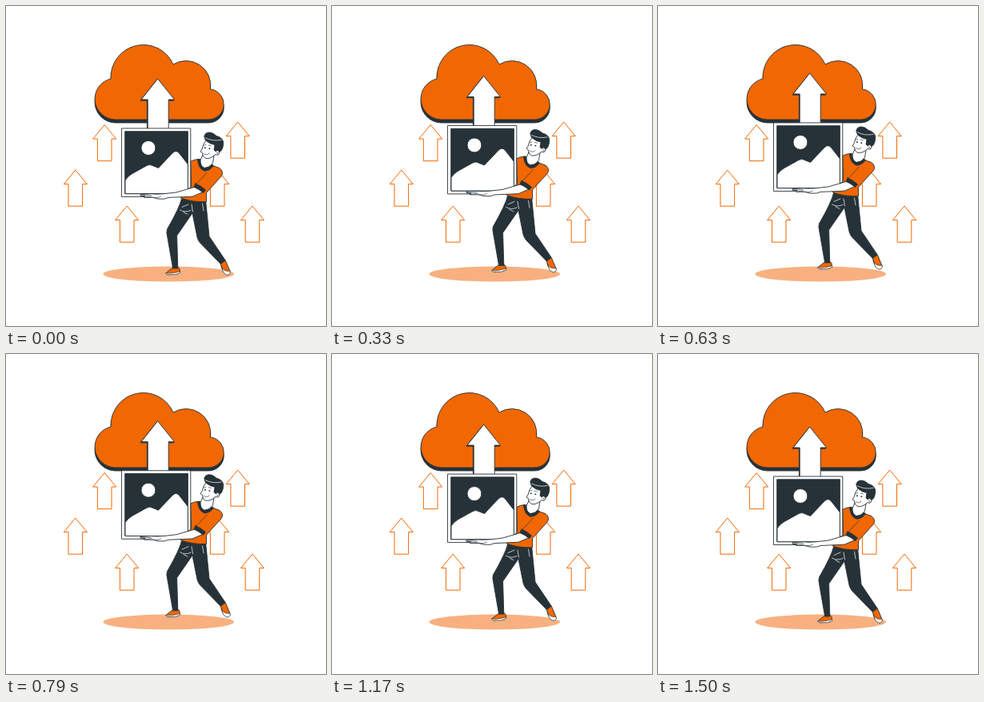
Write an HTML page that moves like this. It is 400 px wide and 400 px high and loops after 1540 ms.

```html
<!DOCTYPE html>
<html lang="en">
<head>
<meta charset="utf-8">
<title>Cloud upload</title>
<style>
  html, body { margin: 0; height: 100%; overflow: hidden; background: #fff; }
  svg { display: block; width: 100vw; height: 100vh; }
  .orange { fill: #f16702; }
  .dark { fill: #263238; }
  .white { fill: #fff; }
  .line { fill: none; }
  .ink { stroke: #263238; stroke-width: .9; stroke-linejoin: round; stroke-linecap: round; }
  .thin { stroke-width: .65; }
  .chalk { fill: none; stroke: #fff; stroke-width: .7; }
</style>
</head>
<body>
<svg viewBox="0 0 400 400">
  <defs>
    <path id="arrow" d="M0 0L14.5 17.6H8.8V45.2H-8.8V17.6H-14.5Z"/>
    <path id="bigArrow" d="M189.8 91.3L210.5 117H203.2V154H177.2V117H169.3Z"/>
    <path id="cloud" d="M136 142A25.85 25.85 0 0 1 131 91A40.7 40.7 0 0 1 209 73A30.8 30.8 0 0 1 255.5 104A19.07 19.07 0 0 1 253 142Z"/>
  </defs>

  <ellipse cx="203.2" cy="335" rx="81.8" ry="9.6" fill="#f8b080"/>
  <g id="arrows" fill="#fff" stroke="#f16702"></g>
  <g class="ink">
    <use href="#cloud" class="dark" y="4"/>
    <use href="#cloud" class="orange"/>
  </g>

  <g id="lift" class="ink">
    <use href="#bigArrow" class="dark" x="-.8" y="1.2"/>
    <use href="#bigArrow" class="white"/>

    <g id="picture">
      <rect class="white" x="144.8" y="153" width="86" height="85.5"/>
      <rect class="dark" x="149" y="156.8" width="78.4" height="77.6"/>
      <circle class="white" cx="178" cy="177.5" r="9"/>
      <path class="white" d="M149 234.4V218Q152 213 158 209.5L176 199.5Q180 197.5 183 199.5L190.5 202.5L208 184Q212.5 179.5 216.5 184L227.4 198V234.4Z"/>
    </g>

    <g id="legs">
      <path class="orange" d="M208.5 327L201.5 332.5Q199 335 202 335.8L215 334.8Q218.5 332.5 217 328.5L214.5 326Z"/>
      <path class="white thin" d="M200 333.8Q207 335 217.8 331.8V333.5L212 335.8H202Q199.5 335.8 200 333.8Z"/>
      <path class="orange" d="M268 321.5L270.5 330Q272.5 335 276.5 336Q280.5 335.5 280 331.5L274.5 318.5Z"/>
      <path class="white thin" d="M269.3 326Q272 332.5 280 331.3Q281.3 335.4 277 336.3Q272.5 335.5 271 331Z"/>
      <path class="dark" d="M219.5 241Q217 252 201.5 279Q200.3 283 201.5 287L208.6 328H214.8L213.6 287L233 259L239 289Q240 293 242.5 296L268.3 322.5L274.2 318L254 288L249.5 242Z"/>
      <path class="chalk" d="M217.5 255Q224 259 231 255.5M220 251.5L228 248M222 258L227 260.5M245.5 247L247 256M232 248L233.5 257"/>
    </g>

    <g id="head">
      <path class="white" d="M246.5 185L243 193Q242 201 248.5 203Q255 203 258.5 196L260 187Z"/>
      <path class="white" d="M250 168Q246 173 245.2 178.5L243 182L245.5 183.5Q245.5 189 249.5 190.5Q256 191.5 262 185.5Q266.5 188 267.3 182L264 170Z"/>
      <path class="dark" d="M248 163Q248.5 158.2 254 158Q259 158.2 263 162.5Q270 164 271.7 170Q272 176 269.5 180.5L266.5 182.5Q265 179 262.3 182L260 180L261 173.5Q256 173 251.5 169.5Q248 167 248 163Z"/>
      <path class="chalk" d="M249.5 165Q258 169.5 269 167.5"/>
      <path class="line thin" d="M247.6 174.2L249.7 173.5M253 174.2Q255 173.6 256.5 175M247.5 184.5Q250.5 187.5 254 184.2M263.5 183.5Q265.5 182 265 185"/>
      <circle class="dark" cx="248.8" cy="177.2" r=".5"/>
      <circle class="dark" cx="254.2" cy="178.2" r=".5"/>
    </g>

    <g id="shirt">
      <path class="orange" d="M231.3 194Q236 191.5 241.5 191.5Q242 201 248 203Q254.5 202.5 258 199.5L266.8 202.5Q272.5 207 269.5 212.5L250.5 233.5V244.8Q233 245.5 218.4 240L224 232L231.3 226Z"/>
      <path class="dark" d="M239.5 192L242.5 191.5Q243 201 248 202.5Q254 202 257.3 198L259.5 199.8Q255 206 248.5 206.3Q240.5 204 239.5 192Z"/>
      <path class="line thin" d="M251.5 208L236.5 224"/>
    </g>

    <g id="arm">
      <path class="white" d="M235.5 226.5L213 233L197 234.8L188 235.2L181 234.8L168 235.8Q166.6 236.8 169 237.3L174 237.7Q170.5 238.3 172.5 239.3L184 239.5Q189 242 198 241.2L203 239.5L233 238.2L247.5 232Z"/>
      <path class="line thin" d="M168.5 237.2L181 236.7M173 239.2L182.5 238M184 239.3Q190 240.5 193.5 238"/>
      <path class="dark" d="M237 222L234.8 226.3Q241 228.8 246.5 233.5L249.5 230Q243.5 224.5 237 222Z"/>
    </g>
  </g>
</svg>
<script>
  const LOOP = 1540, STEPS = 37, RISE = 7.4;
  const arrowTips = [[123.2, 148.5], [289.7, 145], [86.8, 205], [264.2, 205], [151.2, 250], [308, 250]];
  document.getElementById('arrows').innerHTML =
    arrowTips.map(([x, y]) => `<use href="#arrow" x="${x}" y="${y}"/>`).join('');

  const lift = document.getElementById('lift');
  const start = performance.now();

  // The figure bobs on a cosine at about 24 steps per second.
  function draw() {
    const time = (performance.now() - start) % LOOP;
    const step = Math.floor((time + 5) / LOOP * STEPS);
    const phase = 2 * Math.PI * (step + 1) / STEPS;
    const y = -RISE * (1 - Math.cos(phase)) / 2;
    lift.setAttribute('transform', `translate(0 ${y.toFixed(3)})`);
    requestAnimationFrame(draw);
  }
  draw();
</script>
</body>
</html>
```
